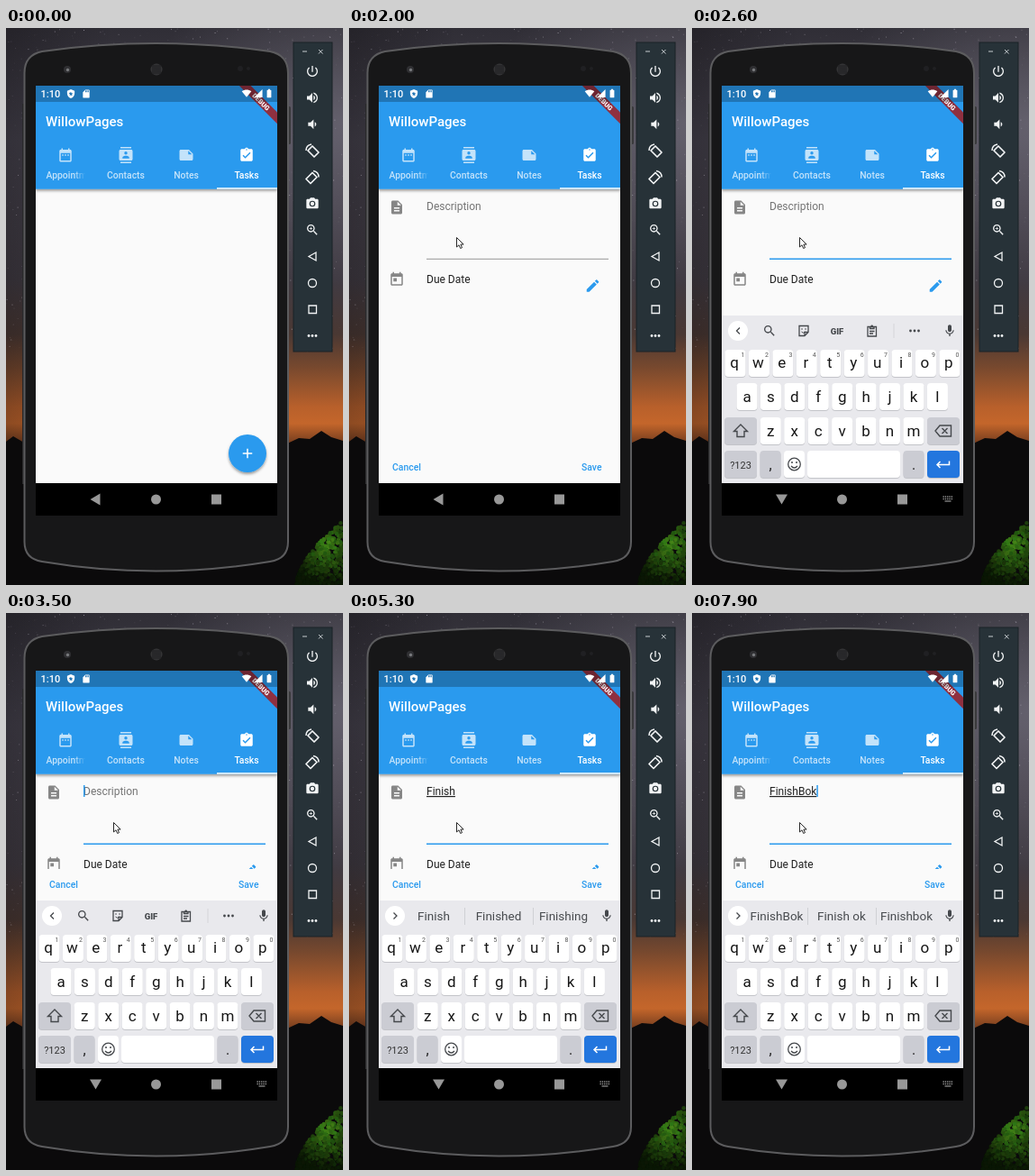
Animation, 374 px wide and 618 px high, one loop 8 s. Source, as an HTML page:

```html
<!DOCTYPE html>
<html lang="en">
<head>
<meta charset="utf-8">
<title>Phone emulator</title>
<style>
html, body { margin: 0; width: 100%; height: 100%; overflow: hidden; background: #000; }
svg { display: block; width: 374px; height: 618px; font-family: Roboto, sans-serif; }
</style>
</head>
<body>
<svg id="stage" viewBox="0 0 374 618" xmlns="http://www.w3.org/2000/svg"></svg>
<script>
const BLUE = '#2a9aee', GREY = '#868686', INK = '#45484c';

// 24-unit icon outlines
const ICONS = {
  range: 'M9 11H7v2h2v-2zm4 0h-2v2h2v-2zm4 0h-2v2h2v-2zm2-7h-1V2h-2v2H8V2H6v2H5c-1.1 0-2 .9-2 2v14c0 1.1.9 2 2 2h14c1.1 0 2-.9 2-2V6c0-1.1-.9-2-2-2zm0 16H5V9h14v11z',
  contacts: 'M20 0H4v2h16V0zM4 24h16v-2H4v2zM20 4H4c-1.1 0-2 .9-2 2v12c0 1.1.9 2 2 2h16c1.1 0 2-.9 2-2V6c0-1.1-.9-2-2-2zm-8 2.75c1.24 0 2.25 1 2.25 2.25s-1 2.25-2.25 2.25S9.75 10.24 9.75 9 10.76 6.75 12 6.75zM17 17H7v-1.5c0-1.67 3.33-2.5 5-2.5s5 .83 5 2.5V17z',
  note: 'M22 10l-6-6H4c-1.1 0-2 .9-2 2v12c0 1.1.9 2 2 2h16c1.1 0 2-.9 2-2v-8zm-7-4.5l5.5 5.5H15V5.5z',
  task: 'M19 3h-4.18C14.4 1.84 13.3 1 12 1s-2.4.84-2.82 2H5c-1.1 0-2 .9-2 2v14c0 1.1.9 2 2 2h14c1.1 0 2-.9 2-2V5c0-1.1-.9-2-2-2zm-7 0c.55 0 1 .45 1 1s-.45 1-1 1-1-.45-1-1 .45-1 1-1zm-2 14l-4-4 1.41-1.41L10 14.17l6.59-6.59L18 9l-8 8z',
  doc: 'M14 2H6c-1.1 0-2 .9-2 2v16c0 1.1.9 2 2 2h12c1.1 0 2-.9 2-2V8l-6-6zm2 16H8v-2h8v2zm0-4H8v-2h8v2zm-3-5V3.5L18.5 9H13z',
  today: 'M19 3h-1V1h-2v2H8V1H6v2H5c-1.1 0-2 .9-2 2v14c0 1.1.9 2 2 2h14c1.1 0 2-.9 2-2V5c0-1.1-.9-2-2-2zm0 16H5V8h14v11zM7 10h5v5H7z',
  edit: 'M3 17.25V21h3.75L17.81 9.94l-3.75-3.75L3 17.25zM20.71 7.04c.39-.39.39-1.02 0-1.41l-2.34-2.34c-.39-.39-1.02-.39-1.41 0l-1.83 1.83 3.75 3.75 1.83-1.83z',
  plus: 'M19 13h-6v6h-2v-6H5v-2h6V5h2v6h6v2z',
  shield: 'M12 1L3 5v6c0 5.5 3.8 10.7 9 12 5.2-1.3 9-6.5 9-12V5l-9-4zm0 6l1.5 3.4 3.7.4-2.7 2.5.7 3.7-3.2-1.9L8.8 16l.7-3.7-2.7-2.5 3.7-.4z',
  card: 'M18 2h-8L4 8v12c0 1.1.9 2 2 2h12c1.1 0 2-.9 2-2V4c0-1.1-.9-2-2-2zm-6 6h-2V4h2v4zm3 0h-2V4h2v4zm3 0h-2V4h2v4z',
  wifi: 'M12 21.5L23.6 7C20 4.3 16 3 12 3S4 4.3.4 7z',
  signal: 'M2 22h20V2z',
  battery: 'M15.7 4H14V2h-4v2H8.3C7.6 4 7 4.6 7 5.3v15.4c0 .7.6 1.3 1.3 1.3h7.4c.7 0 1.3-.6 1.3-1.3V5.3c0-.7-.6-1.3-1.3-1.3z',
  power: 'M13 3h-2v10h2V3zm4.83 2.17l-1.42 1.42C18 7.86 19 9.8 19 12c0 3.87-3.13 7-7 7s-7-3.13-7-7c0-2.2 1-4.14 2.58-5.42L6.17 5.17C4.23 6.82 3 9.26 3 12c0 4.97 4.03 9 9 9s9-4.03 9-9c0-2.74-1.23-5.18-3.17-6.83z',
  louder: 'M3 9v6h4l5 5V4L7 9H3zm13.5 3c0-1.77-1-3.29-2.5-4v8c1.5-.7 2.5-2.23 2.5-4zM14 3.23v2.06c2.89.86 5 3.54 5 6.71s-2.11 5.85-5 6.71v2.06c4-.9 7-4.5 7-8.77s-3-7.86-7-8.77z',
  quieter: 'M18.5 12c0-1.77-1-3.29-2.5-4v8c1.5-.7 2.5-2.23 2.5-4zM5 9v6h4l5 5V4L9 9H5z',
  camera: 'M9 2L7.17 4H4c-1.1 0-2 .9-2 2v12c0 1.1.9 2 2 2h16c1.1 0 2-.9 2-2V6c0-1.1-.9-2-2-2h-3.17L15 2H9zm3 15a5 5 0 1 1 0-10 5 5 0 0 1 0 10zm0-1.8a3.2 3.2 0 1 0 0-6.4 3.2 3.2 0 0 0 0 6.4z',
  search: 'M15.5 14h-.8l-.3-.3C15.4 12.6 16 11.1 16 9.5 16 5.9 13.1 3 9.5 3S3 5.9 3 9.5 5.9 16 9.5 16c1.6 0 3.1-.6 4.2-1.6l.3.3v.8l5 5 1.5-1.5-5-5zm-6 0C7 14 5 12 5 9.5S7 5 9.5 5 14 7 14 9.5 12 14 9.5 14z',
  mic: 'M12 14c1.66 0 3-1.34 3-3V5c0-1.66-1.34-3-3-3S9 3.34 9 5v6c0 1.66 1.34 3 3 3zm5.3-3c0 3-2.54 5.1-5.3 5.1S6.7 14 6.7 11H5c0 3.41 2.72 6.23 6 6.72V21h2v-3.28c3.28-.48 6-3.3 6-6.72h-1.7z'
};
ICONS.zoom = ICONS.search + 'M12 10h-2v2H9v-2H7V9h2V7h1v2h2v1z';

const icon = (name, x, y, size, fill, more = '') =>
  `<path d="${ICONS[name]}" fill="${fill}" fill-rule="evenodd" ${more} transform="translate(${x - size / 2} ${y - size / 2}) scale(${size / 24})"/>`;
const text = (x, y, size, str, fill, more = '') =>
  `<text x="${x}" y="${y}" font-size="${size}" fill="${fill}" ${more}>${str}</text>`;
const rect = (x, y, w, h, fill, more = '') =>
  `<rect x="${x}" y="${y}" width="${w}" height="${h}" fill="${fill}" ${more}/>`;
const circle = (x, y, r, fill, more = '') => `<circle cx="${x}" cy="${y}" r="${r}" fill="${fill}" ${more}/>`;
const line = (d, color, width = 1.3, more = '') =>
  `<path d="${d}" fill="none" stroke="${color}" stroke-width="${width}" ${more}/>`;
const MID = 'text-anchor="middle" ', MEDIUM = 'font-weight="500" ', BLACK = 'font-weight="900" ';

let seed = 7;
const rnd = () => (seed = (seed * 16807) % 2147483647) / 2147483647;

function wallpaper() {
  let s = rect(0, 0, 374, 618, 'url(#sky)') + rect(0, 0, 374, 300, 'url(#glow)') + rect(0, 0, 120, 470, 'url(#dusk)');
  for (let i = 0; i < 1500; i++)
    s += rect((rnd() * 374).toFixed(1), (rnd() * 360).toFixed(1), 1, 1, '#d5d0dc', `opacity="${(rnd() ** 3 * .55).toFixed(2)}"`);
  s += '<path d="M0 459L8 453 20 460 160 470 310 462 325 455 337 456 350 447 361 454 374 458V618H0z" fill="#0b0a0b"/>';
  for (let i = 0; i < 420; i++) {
    const u = rnd(), x = 322 + u * 54, y = 618 - rnd() * 74 * u ** .6;
    const light = 30 - Math.hypot(x - 356, (y - 572) * .9) * .62 + rnd() * 8 - 4;
    s += circle(x.toFixed(1), y.toFixed(1), 2.2, `hsl(${94 + rnd() * 12 | 0} 70% ${Math.max(5, light) | 0}%)`);
  }
  return s;
}

function phone() {
  const body = 'M20.500 50Q20.500 30 40 26Q166 8 293 26Q313 30 313 50V570Q313 589 293 592Q166 613 40 592Q20.500 589 20.500 570Z'.replaceAll('.500', '.5');
  let s = rect(312, 87, 4, 42, '#3a3a3c', 'rx="1.5"') + rect(18, 84, 3, 422, '#29292b');
  s += `<path d="${body}" fill="#171718" stroke="#5c5c5e" stroke-width="2"/>`;
  s += circle(68, 46, 4, '#303033') + circle(68.5, 46.5, 1.7, '#77797c');
  s += circle(167, 46, 6.5, '#39393b');
  for (let i = -4; i <= 4; i += 2) s += line(`M161.5 ${46 + i}h11M${167 + i} 40.5v11`, '#202022', .8);
  return s + circle(260, 45, 3, '#202023') + circle(269, 45, 2, '#202023');
}

function sidebar() {
  const W = '#f2f4f5';
  let s = rect(319, 16, 43, 343, '#273238', 'stroke="#1a2226"');
  s += line('M329 26h5M347 24l4.5 4.5M351.5 24l-4.5 4.5', '#c7cdd0', 1);
  ['power', 'louder', 'quieter'].forEach((n, i) => s += icon(n, 340, 48 + i * 29.4, 16, W));
  for (const [y, flip] of [[136, 1], [165.5, -1]])
    s += `<g transform="translate(340 ${y}) scale(${flip} 1)">` +
      line('M0-5L7 2 2 7-5 0Z', W, 1.7, 'stroke-linejoin="round"') + line('M-7 0Q-7-6-1-7', W, 1.5) + '</g>';
  s += icon('camera', 340, 195, 16, W) + icon('zoom', 340, 224, 16, W);
  s += line('M344 249v9l-8-4.5z', W) + circle(340, 283, 4.5, 'none', `stroke="${W}" stroke-width="1.3"`);
  s += line('M336 308h8.5v8.5h-8.5z', W);
  for (const x of [336, 340, 344]) s += circle(x, 341.5, 1.4, W);
  return s;
}

function appBar() {
  const soft = i => i < 3 ? 'opacity=".72"' : '';
  let s = rect(33, 64, 268, 114.7, BLUE, 'filter="url(#shade)"');
  s += text(44, 109, 15, 'WillowPages', '#fff', MEDIUM);
  ['range', 'contacts', 'note', 'task'].forEach((n, i) => s += icon(n, 66 + i * 67, 141, 18, '#fff', soft(i)));
  s += text(44.5, 167, 10.4, 'Appointments', 'url(#fade)', MEDIUM);
  ['Contacts', 'Notes', 'Tasks'].forEach((t, i) => s += text(133 + i * 67, 167, 10.4, t, '#fff', MID + MEDIUM + soft(i + 1)));
  s += rect(234, 177.2, 67, 1.5, '#fff');
  s += '<g transform="translate(301 64) rotate(45)">' + rect(-40, 20.8, 80, 9, '#8f3040') +
    text(0, 28, 7.4, 'DEBUG', '#fff', MID + BLACK) + '</g>';
  // the system status strip lies over the app and its ribbon
  s += rect(33, 64, 268, 18, '#000', 'opacity=".24"');
  s += text(38.5, 77, 11, '1:10', '#fff', MEDIUM) + icon('shield', 72, 73, 11, '#fff') + icon('card', 89, 73, 11, '#fff');
  return s + icon('wifi', 267, 72.5, 11, '#fff') + icon('signal', 280, 72.5, 11, '#fff') + icon('battery', 292, 72.5, 11.5, '#fff');
}

const navShapes = back => rect(33, 505, 268, 36, '#000') +
  `<path d="${back}" fill="#989898"/>` + circle(166.5, 523, 5.5, '#989898') + rect(228, 517.5, 11, 11, '#989898');

function form() {
  const s = '<g clip-path="url(#view)">' + icon('doc', 53, 199, 18, GREY) +
    text(86, 202, 12, 'Description', '#747474', 'id="hint"') + text(86, 202, 12, '', '#222', 'id="typed" text-decoration="underline"') +
    rect(86, 191, 1.5, 13, BLUE, 'id="caret"') + '<path id="rule" d="M86 256.300H288"/>'.replace('.300', '.3') +
    icon('today', 53, 279, 18, GREY) + text(86, 283, 12, 'Due Date', '#222') + icon('edit', 270.5, 286, 18, BLUE) + '</g>';
  return s + '<g id="actions">' + text(48, 491, 10.4, 'Cancel', BLUE, MEDIUM) + text(258, 491, 10.4, 'Save', BLUE, MEDIUM) + '</g>';
}

const key = (x, y, w, fill = '#fff') =>
  rect(x, y + 1, w, 30, '#c3c4c9', 'rx="4"') + rect(x, y, w, 30, fill, 'rx="4"');

function keyboard() {
  const DIM = '#cbccd3', step = 26.43;
  let s = rect(33, 319, 268, 187, '#e9e9ed') + circle(51, 336, 11, '#fff') + icon('mic', 286, 336, 16, INK);
  s += '<g id="tools">' + line('M53 332.5l-3.5 3.5 3.5 3.5', INK) + icon('search', 86, 336, 16, INK) +
    line('M119 330.5h10v7l-4 4h-6zM129 337.5h-4v4', INK) + line('M121.5 337q2 2.5 4 0', INK, 1) + circle(122, 334, .8, INK) + circle(126, 334, .8, INK) +
    text(161, 340, 9.5, 'GIF', INK, MID + BLACK) +
    line('M195 331.5h9.5v10.5h-9.5zM197.5 331.5v2h4.5v-2M197 336.5h5.5M197 339h4', INK) + circle(199.7, 330.7, 1.3, INK) +
    line('M224 328v16', '#d4d5d9', 1);
  for (const x of [242.5, 247, 251.5]) s += circle(x, 336, 1.4, INK);
  s += '</g><g id="words">' + line('M49.5 332.5l3.5 3.5-3.5 3.5', INK) + line('M128.5 327v19M204.5 327v19', '#cfd0d4', 1);
  for (const x of [94, 166, 238]) s += text(x, 341, 13.5, '', '#484b4f', MID);
  s += '</g>';
  [['qwertyuiop', 48, 357, 377], ['asdfghjkl', 61, 394, 415], ['zxcvbnm', 87.3, 432, 453]].forEach(([row, x0, y, base], r) =>
    [...row].forEach((c, i) => {
      const x = x0 + i * step;
      s += key(x - 11.5, y, 23) + text(x - (r ? 0 : 1), base, 17, c, '#161616', MID);
      if (!r) s += text(x + 8.5, 365, 7, (i + 1) % 10, '#555', MID);
    }));
  s += key(36, 432, 36, DIM) + line('M54 440l7.5 7.5h-3.5v6h-8v-6h-3.5z', INK, 1.4);
  s += key(261, 432, 36, DIM) + line('M275 441h12.5v12h-12.5l-5-6zM277.5 444l6 6M283.5 444l-6 6', INK, 1.4);
  s += key(36, 469, 36, DIM) + text(54, 489, 11, '?123', '#333', MID) + key(75.5, 469, 23, DIM) + text(87, 490, 16, ',', '#222', MID);
  s += key(102, 469, 23) + circle(113.5, 484, 6.8, 'none', `stroke="${INK}" stroke-width="1.3"`) +
    circle(111, 482, 1, INK) + circle(116, 482, 1, INK) + line('M110 486q3.5 4 7 0', INK);
  s += key(128, 469, 103) + key(234.5, 469, 23, DIM) + text(246, 490, 16, '.', '#222', MID);
  s += key(261, 469, 36, '#2376de') + line('M285.5 480.5v4h-13M275.5 481l-3.5 3.5 3.5 3.5', '#fff', 1.5);
  s += navShapes('M93 517.5h13l-6.5 11z') + line('M278.5 520h11M278.5 522.5h11', '#989898', 1.3, 'stroke-dasharray="1.3 1"');
  return s + line('M280.5 525h7', '#989898', 1.2);
}

const stage = document.getElementById('stage');
stage.innerHTML = `<defs>
  <linearGradient id="sky" x2="0" y2="1">
    <stop stop-color="#302e36"/><stop offset=".2" stop-color="#44414c"/><stop offset=".45" stop-color="#403b43"/>
    <stop offset=".55" stop-color="#4a3833"/><stop offset=".61" stop-color="#78492e"/><stop offset=".68" stop-color="#b8602b"/>
    <stop offset=".71" stop-color="#c4662b"/><stop offset=".75" stop-color="#6b381d"/>
  </linearGradient>
  <radialGradient id="glow" cx="1" cy=".35" r=".6">
    <stop stop-color="#8d8997" stop-opacity=".45"/><stop offset="1" stop-color="#8d8997" stop-opacity="0"/>
  </radialGradient>
  <linearGradient id="dusk"><stop stop-color="#0c0a0c" stop-opacity=".3"/><stop offset="1" stop-color="#0c0a0c" stop-opacity="0"/></linearGradient>
  <linearGradient id="fade" gradientUnits="userSpaceOnUse" x1="76" x2="88" y1="0" y2="0">
    <stop stop-color="#fff" stop-opacity=".72"/><stop offset="1" stop-color="#fff" stop-opacity="0"/>
  </linearGradient>
  <filter id="shade" x="-30%" y="-30%" width="160%" height="170%"><feDropShadow dx="0" dy="2" stdDeviation="1.8" flood-opacity=".38"/></filter>
  <clipPath id="screen"><rect x="33" y="64" width="268" height="477"/></clipPath>
  <clipPath id="view"><rect id="viewport" x="33" y="179" width="268" height="291"/></clipPath>
</defs>` + wallpaper() + phone() + sidebar() +
  '<g clip-path="url(#screen)">' + rect(33, 64, 268, 477, '#fafafa') +
  '<g id="fab">' + circle(268, 472, 21, BLUE, 'filter="url(#shade)"') + icon('plus', 268, 472, 18, '#fff') + '</g>' +
  `<g id="form">${form()}</g>` + appBar() + navShapes('M104.5 516.5v13l-11-6.5z') + `<g id="keyboard">${keyboard()}</g></g>` +
  '<path id="mouse" d="M0 0V10.5L2.5 8.3 4.2 12 6 11.2 4.4 7.6H7.6Z" fill="#fff" stroke="#111" stroke-width=".9"/>';

const el = id => document.getElementById(id);
const show = (id, on) => el(id).setAttribute('display', on ? 'inline' : 'none');
const set = (id, name, value) => el(id).setAttribute(name, value);
const clamp = v => Math.max(0, Math.min(1, v));
const glide = (t, a, b) => { const p = clamp((t - a) / (b - a)); return p * p * (3 - 2 * p); };

const OPEN = 700, FOCUS = 2050, SLIDE = 2250, RESIZE = 2750, LAG = 200;
const KEYS = [3750, 3950, 4150, 4350, 4550, 4800, 7100, 7400, 7700], WORD = 'FinishBok';
const FINISH = ['Finish', 'Finished', 'Finishing'];
const HINTS = [null, ['F', 'For', 'From'], ['Fi', 'Find', 'First'], ['Fin', 'Find', 'Fine'], FINISH, FINISH, FINISH,
  ['FinishB', 'Finish b', 'Finishb'], ['FinishBo', 'Finish bo', 'Finishbo'], ['FinishBok', 'Finish ok', 'Finishbok']];
const typedBy = t => KEYS.filter(k => k <= t).length;
const slots = el('words').querySelectorAll('text');

function draw(t) {
  const focused = t >= FOCUS, bottom = t >= RESIZE ? 319 : 505, n = typedBy(t);
  show('fab', t < OPEN);
  show('form', t >= OPEN);
  set('viewport', 'height', bottom - 35 - 179);
  set('actions', 'transform', `translate(0 ${bottom - 505})`);
  set('rule', 'stroke', focused ? BLUE : '#8d8d8d');
  set('rule', 'stroke-width', focused ? 1.5 : .9);

  show('hint', !n);
  el('typed').textContent = WORD.slice(0, n);
  const since = t - (n ? KEYS[n - 1] : FOCUS);
  show('caret', focused && since % 1000 < 500);
  set('caret', 'x', 86 + (n ? el('typed').getComputedTextLength() : 0));

  const rise = clamp((t - SLIDE) / 350);
  show('keyboard', rise > 0);
  set('keyboard', 'transform', `translate(0 ${222 * (1 - rise) ** 2})`);
  const hints = HINTS[typedBy(t - LAG)];
  show('tools', !hints);
  show('words', hints);
  if (hints) slots.forEach((s, i) => s.textContent = hints[i]);

  const a = glide(t, 50, 600), b = glide(t, 1150, 1800);
  set('mouse', 'transform', `translate(${380 - 103 * a - 157.5 * b} ${390 + 80 * a - 237.5 * b})`);
}

let start;
function tick(now) {
  start ??= now;
  draw((now - start) % 8000);
  requestAnimationFrame(tick);
}
draw(0);
requestAnimationFrame(tick);
</script>
</body>
</html>
```
